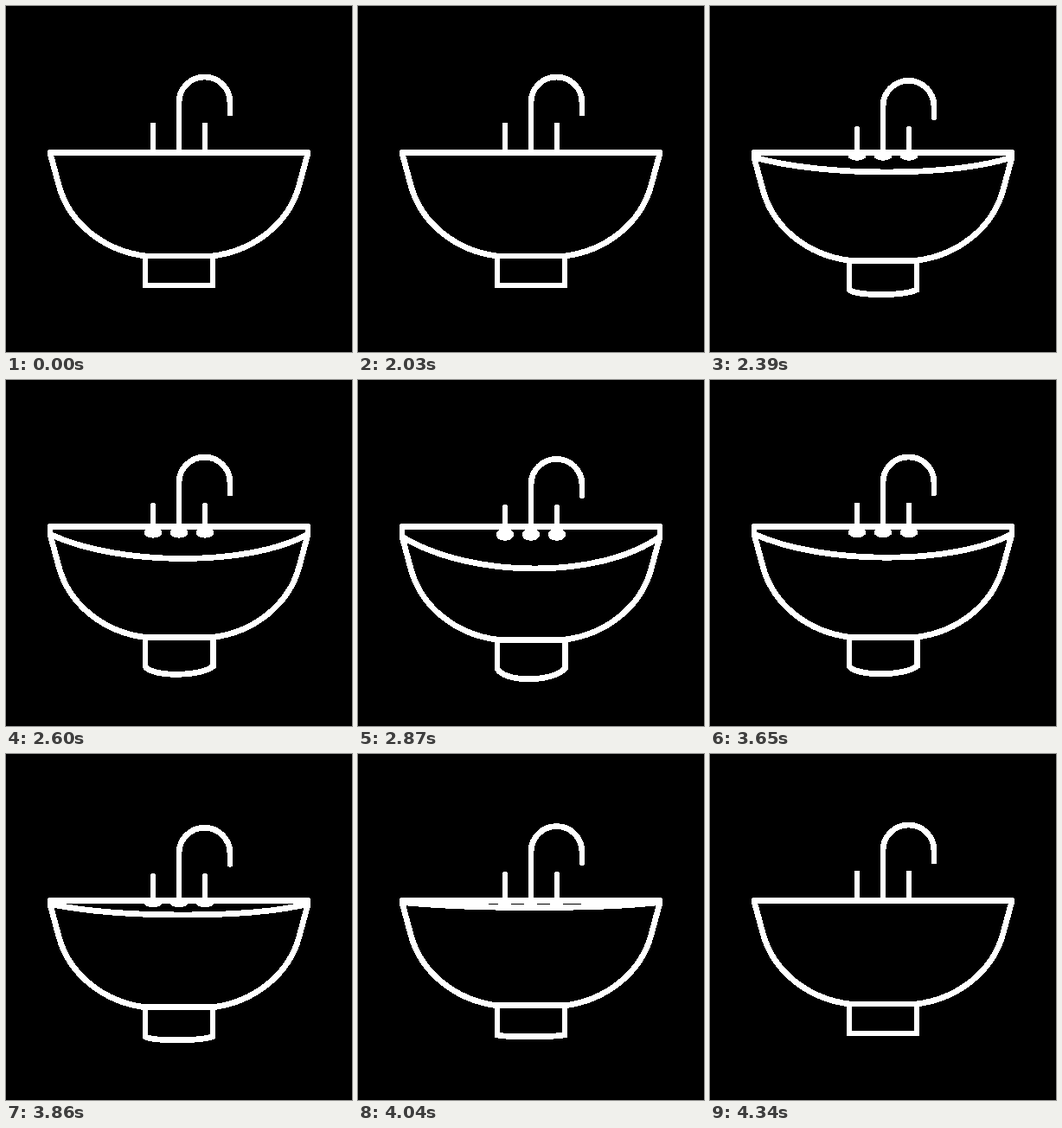
An HTML page that plays this animation: 400 px wide and 400 px high, repeating every 4400 ms.

```html
<!DOCTYPE html>
<html lang="en">
<head>
<meta charset="utf-8">
<title>Sink</title>
<style>
  html, body { margin: 0; width: 100%; height: 100%; overflow: hidden; background: #000; }
  svg { display: block; width: 100vw; height: 100vh; }
</style>
</head>
<body>
<svg viewBox="0 0 400 400" shape-rendering="crispEdges">
  <g fill="none" stroke="#fff" stroke-width="6.8" stroke-linecap="round" stroke-linejoin="round">
    <path id="rim"/>
    <path id="bowl"/>
    <path id="foot" stroke-linejoin="miter"/>
    <path id="tap"/>
  </g>
  <g id="discs" fill="#fff">
    <ellipse cx="170" rx="10.3"/>
    <ellipse cx="200" rx="10.3"/>
    <ellipse cx="230" rx="10.3"/>
  </g>
</svg>
<script>
const LOOP = 4400, START = 2030, STEP = 30;
const TOP = 169.5;

// time in ms, tilt from 0 (front view) to 1
const keys = [
  [2000, 0], [2390, .45], [2540, .67], [2870, .97], [3140, 1],
  [3410, .985], [3620, .76], [3860, .33], [4160, .08], [4340, 0]
];

const rate = i => (keys[i + 1][1] - keys[i][1]) / (keys[i + 1][0] - keys[i][0]);

// harmonic mean of neighbouring rates keeps the curve monotone between keys
function slope(i) {
  if (i === 0 || i === keys.length - 1) return 0;
  const a = rate(i - 1), b = rate(i);
  return a * b > 0 ? 2 * a * b / (a + b) : 0;
}

function tiltAt(t) {
  const last = keys.length - 1;
  if (t < START || t >= keys[last][0]) return 0;
  let i = 0;
  while (t >= keys[i + 1][0]) i++;
  const [t0, a] = keys[i], [t1, b] = keys[i + 1];
  const d = t1 - t0, u = (t - t0) / d, v = 1 - u;
  return v * v * (1 + 2 * u) * a + u * u * (3 - 2 * u) * b
    + d * u * v * (v * slope(i) - u * slope(i + 1));
}

const el = id => document.getElementById(id);
const setPath = (id, d) => el(id).setAttribute('d', d);

function draw(p) {
  const drop = 11.5 * p, side = TOP + 12 * p;
  const ctrl = side + 38 * p * 4 / 3;
  setPath('rim', `M51 ${TOP}H349V${side}C280 ${ctrl} 132 ${ctrl} 51 ${side}Z`);

  const y = n => n + drop;
  setPath('bowl', `M51 ${y(170)}L61 ${y(207)}C73 ${y(252)} 114 ${y(283)} 161 ${y(289)}`
    + `H239C286 ${y(283)} 327 ${y(252)} 339 ${y(207)}L349 ${y(170)}`);

  const base = 323 + 11 * p, curve = base + 16.6 * p, right = 239 + .2 * p;
  setPath('foot', `M161 ${y(289)}V${base}C169 ${curve} 224 ${curve} ${right} ${base}V${y(289)}`);

  const f = n => n + 9.7 * p;
  setPath('tap', `M170 ${f(TOP)}V${f(138)}M230 ${f(TOP)}V${f(138)}`
    + `M200 ${f(TOP)}V${f(111.5)}A29.5 29.5 0 0 1 259 ${f(111.5)}V${f(124)}`);

  for (const disc of el('discs').children) {
    disc.setAttribute('cy', TOP + 9.5 * p);
    disc.setAttribute('ry', 3 + 4.2 * p);
  }
}

const begin = performance.now();
function tick() {
  const t = (performance.now() - begin) % LOOP;
  draw(tiltAt(START + Math.floor((t - START) / STEP) * STEP));
  requestAnimationFrame(tick);
}
tick();
</script>
</body>
</html>
```
